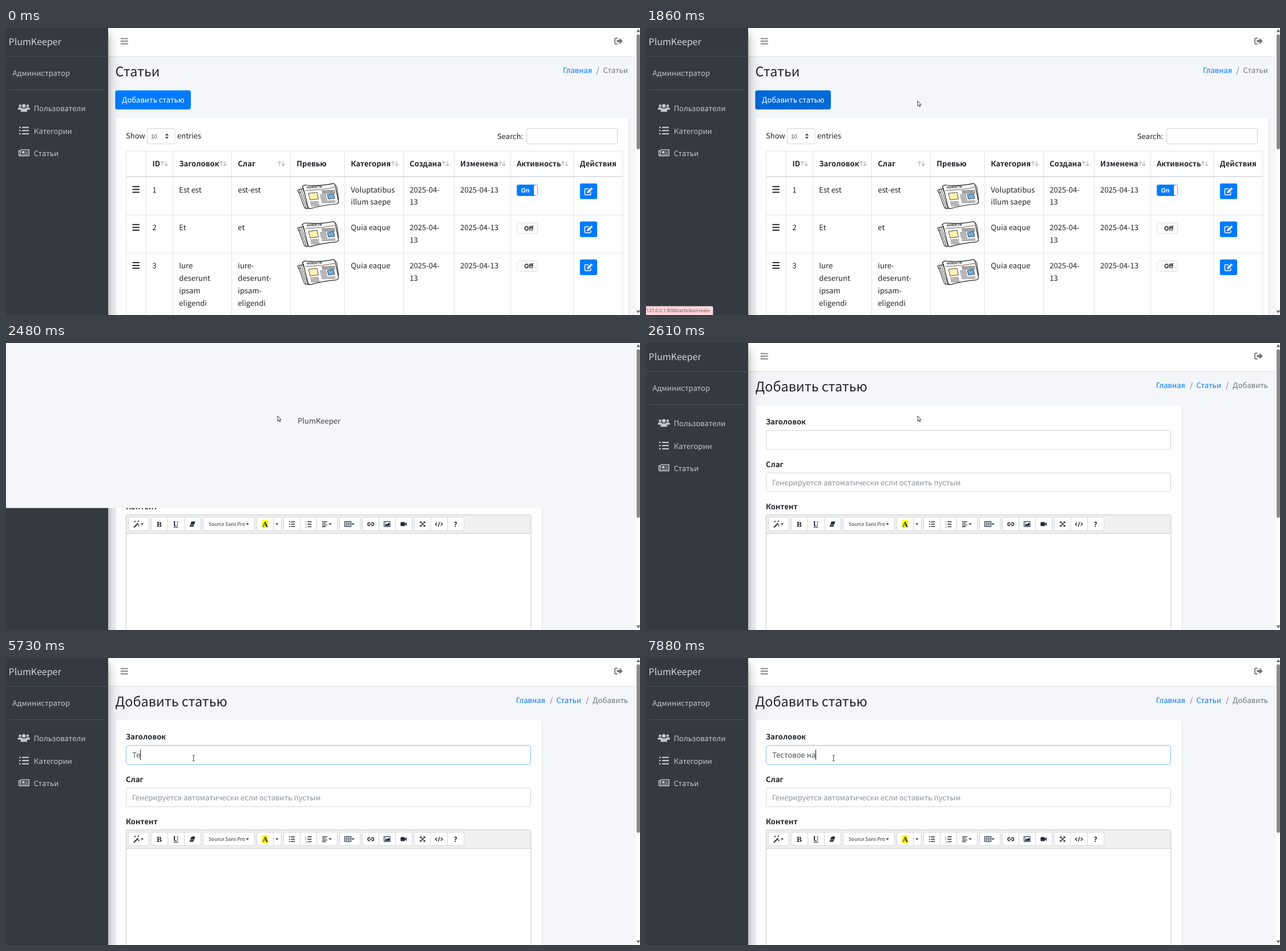
Recreate the animation shown at these times as an HTML page. Size 1111 by 504 pixels, loop 8000 ms.

```html
<!DOCTYPE html>
<html lang="ru">
<head>
<meta charset="utf-8">
<title>Статьи</title>
<style>
html, body { margin: 0; width: 100%; height: 100%; overflow: hidden; background: #f4f6f9; }
svg { display: block; width: 1111px; height: 504px; }
text {
  font-family: "Noto Sans CJK JP", "Noto Sans CJK SC", "Noto Sans CJK KR", "Noto Sans CJK", "Noto Sans", sans-serif;
  font-size: 13.05px; white-space: pre; text-rendering: geometricPrecision;
}
.card { filter: drop-shadow(0 1px 1.3px rgba(0,0,0,.2)); }
.far { filter: drop-shadow(0 13px 12px rgba(0,0,0,.25)); }
.near { filter: drop-shadow(0 9px 5px rgba(0,0,0,.22)); }
</style>
</head>
<body>
<svg id="stage" viewBox="0 0 1111 504" xmlns="http://www.w3.org/2000/svg"></svg>
<script>
const INK = '#212529', BLUE = '#007bff', GREY = '#6c757d', LINE = '#dee2e6', SIDE = '#c2c7d0';
const BRAND = 'PlumKeeper';
const stage = document.getElementById('stage');

const text = (x, y, s, fill = INK, extra = '') => `<text x="${x}" y="${y}" fill="${fill}" ${extra}>${s}</text>`;
const bold = (x, y, s, extra = '') => text(x, y, s, INK, 'font-weight="700" ' + extra);
const rect = (x, y, w, h, fill, extra = '') => `<rect x="${x}" y="${y}" width="${w}" height="${h}" fill="${fill}" ${extra}/>`;
const fillPath = (d, fill, extra = '') => `<path d="${d}" fill="${fill}" ${extra}/>`;
const strokePath = (d, color, w = 1, extra = '') => `<path d="${d}" fill="none" stroke="${color}" stroke-width="${w}" ${extra}/>`;
const group = (x, y, body, extra = '') => `<g transform="translate(${x} ${y})" ${extra}>${body}</g>`;
const field = (x, y, w, h, extra = '') => rect(x + .5, y + .5, w - 1, h - 1, '#fff', `rx="3.4" stroke="#ced4da" ${extra}`);
const END = 'text-anchor="end"', MID = 'text-anchor="middle"';

const bars = (x, y, w, gap, thick, color) =>
  strokePath([-1, 0, 1].map(i => `M${x} ${y + i * gap}h${w}`).join(''), color, thick, 'stroke-linecap="round"');
const bullets = (x, y, w, gap, thick, color) =>
  strokePath([-1, 0, 1].map(i => `M${x} ${y + i * gap}h${thick * 1.3}m${thick} 0H${x + w}`).join(''), color, thick);

function person(x, y, s) {
  return group(x, y, `<circle cy="-4" r="3.1"/><path d="M-5.4 6V3.6Q-5.4 .2-2 .2H2Q5.4 .2 5.4 3.6V6Z"/>`.replace(/^/, `<g transform="scale(${s})">`) + '</g>', `fill="${SIDE}"`);
}

function sidebar() {
  const panel = cls => rect(-60, 0, 239, 600, '#343a40', `class="${cls}"`);
  const newsIcon = strokePath('M25.5 213.8H40.2V224.4H24Q22.6 224.4 22.6 223V215.6H25.5V223', SIDE, 1.6) +
    rect(28, 216.2, 4.6, 3.8, SIDE) + strokePath('M34 217h4.2M34 219.6h4.2M28 222h10.2', SIDE, 1.1);
  return panel('far') + panel('near') +
    text(4.5, 29.5, BRAND, '#d3d5d7', 'style="font-size:16px" font-weight="300"') +
    rect(0, 49.5, 179, 1, '#4b545c') + rect(5, 107.8, 168, 1, '#4f5962') +
    text(11.5, 84, 'Администратор', SIDE) +
    person(24.6, 139.3, .72) + person(38, 139.3, .72) + person(31.3, 141, 1.05) +
    bullets(23, 180.2, 17, 5.6, 2.2, SIDE) + newsIcon +
    text(48.7, 146.3, 'Пользователи', SIDE) + text(48.7, 185.8, 'Категории', SIDE) + text(48.7, 224.8, 'Статьи', SIDE);
}

function scrollbar(bottom) {
  return rect(1103, 0, 8, 504, '#fcfcfc') + rect(1105, 11, 6, bottom - 11, '#8b8b8b', 'rx="3"') +
    fillPath('M1104.5 7.2L1108 2l3.5 5.2ZM1104.5 496L1108 501l3.5-5Z', '#6f6f6f');
}

function shell(title) {
  const exit = strokePath('M1071.5 18H1068.6Q1067 18 1067 19.6V26.4Q1067 28 1068.6 28H1071.5', '#777', 1.8) +
    fillPath('M1070.5 21H1075V17.4L1081 23L1075 28.6V25H1070.5Z', '#777');
  return rect(0, 0, 1111, 504, '#f4f6f9') + rect(179, 0, 924, 50, '#fff') + rect(179, 49.3, 924, 1, LINE) +
    bars(201.6, 23.2, 11.6, 4.6, 1.7, '#7a7a7a') + exit +
    text(191.5, 84.8, title, INK, 'style="font-size:23.4px"');
}

const upDown = x => strokePath(`M${x + 4} 242.5V234.4M${x + 1} 237.4L${x + 4} 234.2L${x + 7} 237.4` +
  `M${x + 10.6} 234V242M${x + 7.6} 239L${x + 10.6} 242.2L${x + 13.6} 239`, '#b5b8ba', 1.2);

function newspaper(x, y) {
  const rows = (x0, y0, w, n, step) => Array.from({ length: n }, (_, i) =>
    `M${x0 + i * .5} ${y0 + i * step}l${w} ${-w * .04}`).join('');
  return group(x, y,
    fillPath('M3 12Q1 14 4 16L13 41Q15 46 20 45L27 44L22 8Z', '#fff', 'stroke="#222" stroke-width="1.1"') +
    strokePath('M5 11L17 44M8 10L20 44.5M11 9.4L23 44M3 17Q6 15 8 18', '#222', .9) +
    fillPath('M10 7Q13 3 18 4Q44 6 64 1.2Q67 1 67.6 4L73.6 32Q74 36 70 37Q46 39 25 45Q21 46 20 42L13 13Q12 8 10 7Z', '#fff', 'stroke="#222" stroke-width="1.2" stroke-linejoin="round"') +
    strokePath('M67 3Q71 5 71 9L74 30', '#222', 1) +
    `<g transform="rotate(-3 18 10)">${text(18, 10, 'НОВОСТИ', '#222', 'style="font-size:5.4px" font-weight="700"')}</g>` +
    strokePath('M16 13.2Q42 13 67 8', '#333', .8) +
    strokePath(rows(44, 14, 23, 3, 2.2), '#333', 1) +
    strokePath(rows(41, 21, 11, 5, 2.3), '#444', .9) +
    strokePath(rows(24, 33.5, 15, 4, 2.3), '#444', .9) +
    strokePath(rows(44, 32.5, 24, 2, 2.3), '#444', .9) +
    fillPath('M21 18.5L36 16.5L38.5 28L24 30Z', '#fff3ae', 'stroke="#333" stroke-width=".9"') +
    fillPath('M54 20.5L65 19L67 27L56 28.5Z', '#62b0e8', 'stroke="#333" stroke-width=".9"'));
}

function toggle(y, on) {
  const label = 'style="font-size:10.8px" font-weight="700"';
  return on
    ? rect(895.5, y + .5, 36, 19, BLUE, `rx="3" stroke="${BLUE}"`) + rect(925, y + .8, 6.3, 18.4, '#fff', 'rx="2"') + text(902.5, y + 14, 'On', '#fff', label)
    : rect(895.5, y + .5, 36, 19, '#f8f9fa', 'rx="3" stroke="#dcdfe2"') + rect(896, y + 1, 6, 18, '#fff', 'rx="2"') + text(908, y + 14, 'Off', INK, label);
}

const editButton = y => rect(1005.7, y, 30.3, 27.4, BLUE, 'rx="3"') + group(1013.5, y + 7,
  strokePath('M7.5 2.2H2Q.8 2.2 .8 3.4V11.6Q.8 12.8 2 12.8H10Q11.2 12.8 11.2 11.6V8.5', '#fff', 1.5) +
  fillPath('M4.4 9.8L5 7L11.6 .5Q12.2 0 12.8 .5L14.2 1.9Q14.7 2.5 14.2 3.1L7.6 9.5Z', '#fff') +
  strokePath('M10.2 2L12.7 4.5', BLUE, .8));

function listPage() {
  const columns = [210.5, 245.5, 292.5, 395.5, 498.5, 593.5, 696.5, 785.5, 884.5, 994.5, 1081];
  const heads = [['ID', 256.5, 270], ['Заголовок', 303.3, 373], ['Слаг', 406.3, 475.3], ['Превью', 509.3],
    ['Категория', 604.3, 674], ['Создана', 707.3, 763], ['Изменена', 796, 862], ['Активность', 895, 972], ['Действия', 1005.5]];
  const rows = [
    [['Est est'], ['est-est'], ['Voluptatibus', 'illum saepe']],
    [['Et'], ['et'], ['Quia eaque']],
    [['Iure', 'deserunt', 'ipsam', 'eligendi'], ['iure-', 'deserunt-', 'ipsam-', 'eligendi'], ['Quia eaque']]];
  const lines = (x, y, list) => list.map((s, i) => text(x, y + i * 21.9, s)).join('');
  const body = rows.map(([name, slug, category], i) => {
    const top = 261.5 + i * 66.7, base = top + 27;
    return bars(222.3, top + 22, 10.8, 4.9, 2, INK) + text(256.5, base, i + 1) +
      lines(303.3, base, name) + lines(406.3, base, slug) + newspaper(509, top + 10.5) +
      lines(604.3, base, category) + lines(707.3, base, ['2025-04-', '13']) + text(796, base, '2025-04-13') +
      toggle(top + 13.5, i === 0) + editButton(top + 11.6);
  }).join('');
  return shell('Статьи') +
    text(1027, 78.8, 'Главная', BLUE, END) + text(1037, 78.8, '/', GREY, MID) + text(1090, 78.8, 'Статьи', GREY, END) +
    rect(191.4, 109.5, 132.5, 33.5, BLUE, 'id="add" rx="3.6"') + text(203, 131, 'Добавить статью', '#fff') +
    rect(191.5, 157.3, 899, 400, '#fff', 'rx="3.6" class="card"') +
    text(210, 194, 'Show') + field(247, 176, 49.5, 28) + text(254, 193.7, '10', '#495057', 'style="font-size:9.8px"') +
    fillPath('M279 188.8L282 185.2L285 188.8ZM279 191L282 194.6L285 191Z', '#343a40') + text(300, 194, 'entries') +
    text(906, 195, 'Search:', INK, END) + field(912, 176, 160, 28) +
    strokePath(columns.map(x => `M${x} 216V504`).join('') + 'M210 216.2H1081.5M210 328.5H1081.5M210 395.5H1081.5', LINE) +
    rect(210, 260, 871.5, 2, LINE) +
    heads.map(([s, x, arrows]) => bold(x, 243.3, s) + (arrows ? upDown(arrows) : '')).join('') +
    body + sidebar() + scrollbar(213);
}

function toolbar() {
  const dark = '#1d2733', y = 318;
  const groups = [[214, 250], [254, 283, 312, 341], [345, 435], [439, 468, 482], [486, 515, 544, 580],
    [584, 620], [624, 653, 682, 711], [715, 744, 773, 802]];
  const frames = groups.map(g => rect(g[0] + .5, 306, g[g.length - 1] - g[0], 23.6, '#fff', 'rx="2.5" stroke="#d3d6d9"') +
    g.slice(1, -1).map(x => rect(x, 306, 1, 23.6, '#d3d6d9')).join('')).join('');
  const caret = x => fillPath(`M${x - 2.6} 316.8h5.2l-2.6 2.8Z`, dark);
  const serif = `${MID} font-weight="700" style="font:700 13.5px 'Liberation Serif',serif"`;
  const wand = strokePath('M224 324L231.5 316.5', dark, 2) +
    strokePath('M226 312v3M224.5 313.5h3M232 311.5v3M230.5 313h3M232.5 318.5v3M231 320h3', dark, .9);
  const eraser = fillPath('M325 313.5H331.5L328.5 322.5H321.5Z', dark) + strokePath('M323.3 319.3L328.5 319.3', '#fff', .9);
  const ordered = strokePath('M528.5 314h7M528.5 318.3h7M528.5 322.6h7', dark, 1.4) +
    [1, 2, 3].map(n => text(524.5, 311.7 + n * 4.3, n, dark, 'style="font-size:4px"')).join('');
  const align = strokePath('M554 313.8h9M554 316.7h6M554 319.6h9M554 322.5h6', dark, 1.3);
  const grid = rect(593.5, 313.5, 11, 9, 'none', `stroke="${dark}"`) +
    strokePath('M593.5 316.5h11M593.5 319.5h11M597.2 313.5v9M600.8 313.5v9', dark, .8);
  const link = strokePath('M638 315.6H636.6a2.6 2.6 0 0 0 0 5.2H638M640.2 315.6H641.8a2.6 2.6 0 0 1 0 5.2H640.2M636.8 318.2H641.6', dark, 1.5);
  const image = rect(662.5, 313.5, 10.5, 9, 'none', `stroke="${dark}"`) +
    fillPath('M664 321.3v-2l2-2 1.5 1.5 3-3.2 1.6 2.2v3.5Z', dark) + `<circle cx="665.3" cy="315.7" r=".9" fill="${dark}"/>`;
  const video = rect(691.5, 314.5, 7.4, 7, dark, 'rx="1"') + fillPath('M698.5 318L702 314.8V321.2Z', dark);
  const expand = strokePath('M726.5 314.5L733.5 321.5M733.5 314.5L726.5 321.5', dark, 1.1) +
    fillPath('M725.4 313.4h3.6l-3.6 3.6ZM734.6 313.4v3.6l-3.6-3.6ZM725.4 322.6v-3.6l3.6 3.6ZM734.6 322.6h-3.6l3.6-3.6Z', dark);
  const code = strokePath('M755.2 315.5L752.4 318.2L755.2 321M762 315.5L764.8 318.2L762 321M759.8 314.2L757.4 322.2', dark, 1.3);
  return rect(210.5, 302, 709.5, 32.5, '#f0f0f0') + rect(210, 333.8, 710, 1, '#c9cccf') + frames +
    wand + caret(238.6) + text(268.5, 322.7, 'B', dark, serif) +
    text(297.5, 322, 'U', dark, serif) + rect(293.3, 323.2, 8.4, 1, dark) + eraser +
    text(355, 321.4, 'Source Sans Pro', '#333', 'style="font-size:8.5px"') + caret(423.2) +
    rect(449, 311, 10.5, 14, '#ff0') + text(454.2, 322.7, 'A', dark, serif) + caret(474.8) +
    bullets(496, y + .3, 10, 4, 1.5, dark) + ordered + align + caret(568) + grid + caret(608) +
    link + image + video + expand + code +
    text(787.5, 322.8, '?', dark, `${MID} font-weight="900" style="font-size:12px"`);
}

function formPage() {
  return shell('Добавить статью') +
    text(945, 78.8, 'Главная', BLUE, END) + text(955.5, 78.8, '/', GREY, MID) +
    text(1008, 78.8, 'Статьи', BLUE, END) + text(1018.5, 78.8, '/', GREY, MID) + text(1090, 78.8, 'Добавить', GREY, END) +
    rect(191.5, 109.3, 747.5, 450, '#fff', 'rx="3.6" class="card"') +
    bold(210, 143.3, 'Заголовок') + field(210, 153, 710, 34.5, 'id="title"') +
    bold(210, 217.5, 'Слаг') + field(210, 227.5, 710, 34) +
    text(221, 249.8, 'Генерируется автоматически если оставить пустым', '#8b939a') +
    bold(210, 291.6, 'Контент') + toolbar() + rect(210.3, 301.8, 709.6, 260, 'none', 'rx="3.4" stroke="#c4c7ca"') +
    text(221.3, 175.3, '', '#495057', 'id="value"') + rect(0, 161, 1, 18, '#111', 'id="caret"') +
    sidebar() + scrollbar(307);
}

const arrow = fillPath('M.5 .5V9.6L2.6 7.7L4 10.8L5.4 10.2L4 7.2H6.6Z', '#fff', 'stroke="#222" stroke-width=".9"');
const hand = fillPath('M-1.3 .8Q0 -.6 1.2 .8V5L5.8 6Q7 6.4 6.8 8L6 12.5H-.6L-4.2 7.6Q-4 6.2-2.6 6.8L-1.3 8Z', '#fff', 'stroke="#222" stroke-width=".9" stroke-linejoin="round"');
const beam = strokePath('M-2 -4.8H-.6Q0 -4.8 0 -4.2Q0 -4.8 .6 -4.8H2M0 -4.5V4.5M-2 4.8H-.6Q0 4.8 0 4.2Q0 4.8 .6 4.8H2', '#333', .9);

stage.innerHTML =
  `<g id="list">${listPage()}</g><g id="form">${formPage()}</g>
  <g id="loader">${rect(0, 0, 1103, 504, '#f4f6f9', 'id="cover"')}${text(0, 0, BRAND, '#3f4449', `id="brand" ${MID}`)}</g>
  <g id="status"><path d="M0 488.5H115Q117.5 488.5 117.5 491V504H0Z" fill="#fbd5d9"/>${text(.5, 499.4, '127.0.0.1:8000/articles/create', '#66494d', `style="font:8.1px 'Open Sans','Noto Sans',sans-serif"`)}</g>
  <g id="cursor"><g id="arrow">${arrow}</g><g id="hand">${hand}</g><g id="beam">${beam}</g></g>`;

const el = Object.fromEntries([...stage.querySelectorAll('[id]')].map(n => [n.id, n]));
const show = (node, on) => node.setAttribute('visibility', on ? 'inherit' : 'hidden');
const clamp = v => Math.max(0, Math.min(1, v));
const smooth = u => u * u * (3 - 2 * u);

// Keys are [time, ...values]; values ease from one key to the next.
function track(keys, t) {
  const i = keys.findIndex(k => k[0] > t);
  if (i === 0) return keys[0].slice(1);
  if (i < 0) return keys[keys.length - 1].slice(1);
  const [a, b] = [keys[i - 1], keys[i]], u = smooth((t - a[0]) / (b[0] - a[0]));
  return a.slice(1).map((v, j) => v + (b[j + 1] - v) * u);
}

const pointer = [[210, 1042, 471], [1000, 313, 165], [1200, 288, 128], [1480, 288, 128], [1860, 475.5, 127.5],
  [2650, 475.5, 127.5], [3250, 328.7, 176]];
const shake = [[2100, 1.8, .9, 0], [2250, -.9, -1.8, -1], [2400, -2.7, 0, 1], [2550, 0, 1.8, 0], [2700, .9, -.9, 1]];
const phrase = 'Тестовое на';
const keyTimes = [5270, 5730, 5960, 6160, 6290, 6570, 6890, 7090, 7220, 7690, 7880];
const LOAD = 2150, FOCUS = 3280;

function render(t) {
  const loaded = t >= LOAD;
  show(el.list, !loaded);
  show(el.form, loaded);

  const [x, y] = track(pointer, t);
  const overButton = !loaded && x > 191 && x < 324 && y > 109 && y < 143;
  const overInput = t > 2610 && y > 153;
  show(el.cursor, t >= 210);
  el.cursor.setAttribute('transform', `translate(${x} ${y})`);
  show(el.hand, t >= 210 && overButton);
  show(el.beam, t >= 210 && overInput);
  show(el.arrow, t >= 210 && !overButton && !overInput);

  const hovered = t > 1000 && (overButton || t > 1300);
  el.add.setAttribute('fill', hovered ? '#0069d9' : BLUE);
  show(el.status, hovered && t < 2260);
  el.status.setAttribute('opacity', loaded ? .45 * (1 - clamp((t - LOAD) / 110)) : 1);

  const height = 504 * (1 - clamp((t - 2396) / 200));
  const [dx, dy, turn] = track(shake, t);
  show(el.loader, loaded && height > 0);
  el.cover.setAttribute('height', height);
  el.brand.setAttribute('transform', `translate(${549.8 + dx} ${height / 2 - 4.3 + dy}) rotate(${turn} 0 -4)`);

  const glow = clamp((t - FOCUS) / 70);
  const mix = (a, b) => Math.round(a + (b - a) * glow);
  el.title.setAttribute('stroke', `rgb(${mix(206, 128)},${mix(212, 189)},${mix(218, 255)})`);
  const typed = keyTimes.filter(k => k <= t);
  el.value.textContent = phrase.slice(0, typed.length);
  const lastInput = typed.length ? typed[typed.length - 1] : FOCUS;
  show(el.caret, t >= FOCUS && Math.floor((t - lastInput) / 530) % 2 === 0);
  el.caret.setAttribute('x', 221 + (typed.length ? el.value.getComputedTextLength() : 0));
}

const start = performance.now();
function tick() {
  render((performance.now() - start) % 8000);
  requestAnimationFrame(tick);
}
tick();
</script>
</body>
</html>
```
